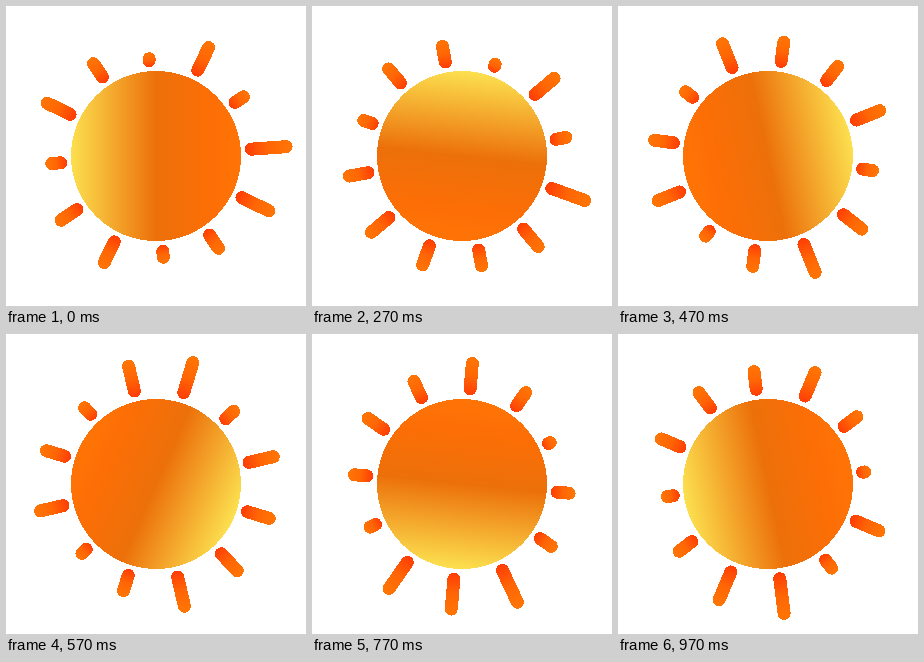
These frames come from a looping animation (300x300 px, 1.01 s). An HTML page:

```html
<!DOCTYPE html>
<html>
<head>
<meta charset="utf-8">
<style>
html, body { margin: 0; width: 100%; height: 100%; overflow: hidden; background: #fff; }
svg { display: block; }
</style>
</head>
<body>
<svg width="300" height="300" viewBox="-150 -150 300 300" shape-rendering="crispEdges">
  <linearGradient id="glow">
    <stop offset="0" stop-color="#fce04f"/>
    <stop offset="0.5" stop-color="#ec700a"/>
    <stop offset="0.8" stop-color="#fc6e06"/>
    <stop offset="1" stop-color="#ff7406"/>
  </linearGradient>
  <linearGradient id="flame">
    <stop offset="0" stop-color="#ff3c05"/>
    <stop offset="0.5" stop-color="#ff6605"/>
    <stop offset="1" stop-color="#ff7605"/>
  </linearGradient>
  <g id="rays"></g>
  <circle id="disk" r="85" fill="url(#glow)"/>
</svg>
<script>
const LOOP = 1010, STEPS = 30, WIDTH = 13, INNER = 89, HALF_PULSE = 4.5;

// Resting length of each ray, and the step at which it pulses
const rest = [35, 30, 16, 6, 23, 19, 9, 25.5, 16, 2, 25, 10];
const beat = [15.5, 5, 23, 9.5, 25, Infinity, 26, 5, 18, 14, 23, 19];

const disk = document.getElementById("disk");
const group = document.getElementById("rays");

function set(el, attrs) {
  for (const name in attrs) el.setAttribute(name, attrs[name]);
  return el;
}

const rays = rest.map(() => group.appendChild(
  set(document.createElementNS("http://www.w3.org/2000/svg", "rect"), {
    x: INNER, y: -WIDTH / 2, height: WIDTH, rx: WIDTH / 2, fill: "url(#flame)"
  })));

// Long rays shrink on their beat, short ones grow
function rayLength(i, step) {
  const d = (step - beat[i]) / HALF_PULSE;
  const swing = rest[i] > 20 ? -13 : 16;
  return rest[i] + swing * Math.max(0, 1 - d * d);
}

function draw(time) {
  const ticks = Math.floor(time % LOOP / 10);
  const step = Math.min(STEPS - 1, Math.floor((ticks + 0.5) * 0.3));
  rays.forEach((ray, i) => set(ray, {
    width: rayLength(i, step) + WIDTH,
    transform: `rotate(${30 * i + 3 * step - 4.1})`
  }));
  set(disk, { transform: `rotate(${12 * step})` });
}

const start = performance.now();
function tick() {
  draw(performance.now() - start);
  requestAnimationFrame(tick);
}
tick();
</script>
</body>
</html>
```
